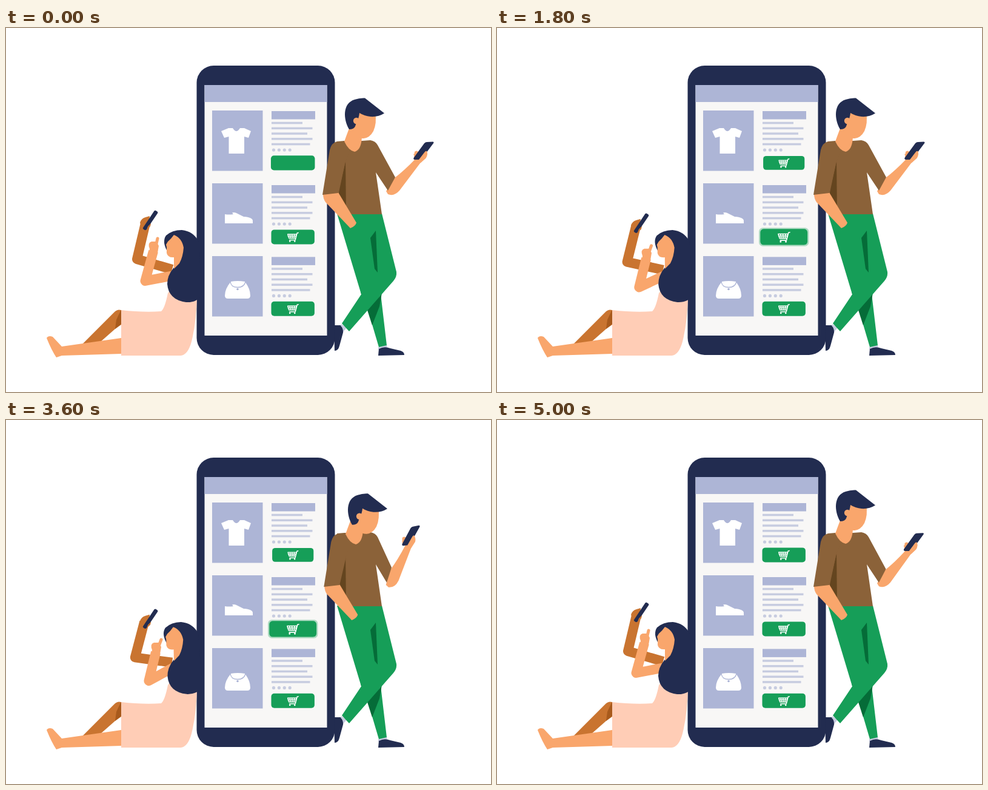
Write an HTML page that moves like this. It is 800 px wide and 600 px high and loops after 5040 ms.

```html
<!DOCTYPE html>
<html lang="en">
<head>
<meta charset="utf-8">
<title>Mobile shopping</title>
<style>
  html, body { margin: 0; width: 100%; height: 100%; overflow: hidden; background: #fff; }
  svg { display: block; width: 100%; height: 100%; }
  .navy { fill: #222c50; } .blue { fill: #adb5d6; } .line { fill: #c7cce0; }
  .green { fill: #169e58; } .deep { fill: #056c38; } .white { fill: #fff; }
  .skin { fill: #f9a66c; } .tan { fill: #c97430; } .shade { fill: #a85a1c; }
  .brown { fill: #8b6239; } .umber { fill: #64451f; } .dress { fill: #ffcdb6; }
  .limb { fill: none; stroke-width: 16; stroke-linejoin: round; }
  .cart { fill: none; stroke: #fff; stroke-width: 1.5; stroke-linecap: round; stroke-linejoin: round; }
</style>
</head>
<body>
<svg viewBox="0 0 800 600" xmlns="http://www.w3.org/2000/svg">
  <clipPath id="view"><rect x="327.500" y="122" width="202" height="372"/></clipPath>

  <!-- Phone -->
  <rect class="navy" x="314.5" y="62" width="228" height="477" rx="28"/>
  <rect x="327.500" y="94" width="202" height="413" fill="#f8f7f6"/>
  <rect class="blue" x="327.500" y="94" width="202" height="28"/>
  <g clip-path="url(#view)"><g id="list"></g></g>

  <!-- Seated woman -->
  <path class="tan" d="M126 521L179 468Q184 463 190 465V489L180 496 155 518Z"/>
  <path class="shade" d="M189 466L182 481 180 496 190 488V465Z"/>
  <path class="skin" d="M67 511Q70 506 77 509L92 525 190 511V537L92 540 83 543Q75 531 67 511Z"/>
  <path class="dress" d="M190 465Q226 469 256 467 262 462 267 437L290 405 315 443Q314 485 306 517 300 539 288 540H190Z"/>
  <path class="limb" id="farArm" stroke="#c97430"/>
  <g id="herPhone">
    <path class="tan" d="M221 321Q223 314 230 312L237 310 236 320 239 323 234 330 226 333Z"/>
    <path class="navy" d="M244.500 301.500Q246 300 248 301.500L250 303Q251 304 250 305.500L232 332Q230 334 228 332.500L226.500 331.500Q225 330 226.500 328.500Z"/>
    <path class="tan" d="M232 332L234 327 239 322 238 327Z"/>
  </g>
  <path class="limb" id="nearArm" stroke="#f9a66c"/>
  <g id="herHand">
    <path class="skin" d="M-7 3L-6 -4Q-10 -14 -3 -16L5 -16 9 -9 7 3Z"/>
    <path id="finger" stroke="#f9a66c" stroke-width="5" stroke-linecap="round"/>
  </g>
  <g id="herHead">
    <path class="navy" d="M266 368Q257 352 264 342 274 333 290 333 309 335 318 352L323 440Q315 453 297 452 268 448 266 422 266 408 276 396L285 384 284 360Z"/>
    <path class="skin" d="M277 341Q290 346 293 362 292 377 286 388L277 397V378Q267 379 265 371L265 361 264 357 267 352Q272 348 277 341Z"/>
  </g>

  <!-- Standing man -->
  <path class="navy" d="M541 490H553Q557 495 556 502L550 524Q548 532 542 532Z"/>
  <path class="line" d="M553 488L562 494 556 501Q556 494 552 491ZM614 526L628 522 629 527 614 530Z"/>
  <path class="navy" d="M615 529Q624 524 634 528L651 532Q657 534 657 539L614 540Z"/>
  <path class="green" d="M585 436L597 465 615 526 628 523 618 438Z"/>
  <path class="deep" d="M596 465L620 437 616 459 604 490Z"/>
  <path class="green" d="M546 306H620L644 402Q645 410 639 417L566 500 554 487 586 439Z"/>
  <path class="deep" d="M610 334L601 346 608 397 613 403Z"/>
  <g id="hand">
    <path class="skin" d="M627 269L641 247Q657 235 676 215L672 208 692 201Q697 207 693 214L683 223 649 268Q640 278 630 274Z"/>
    <g id="hisPhone">
      <path class="skin" id="thumb" d="M673 213L674 204Q677 201 680 204L682 210Z"/>
      <path class="navy" d="M672.500 214L690 190Q692 188 694 188L704 187.500Q706.500 188 705 190L687 214Q684.500 217 682 217H674Q671.500 216.500 672.500 214Z"/>
      <path class="skin" d="M681 217L691 204Q695 200 695 208L692 215 684 222Z"/>
    </g>
  </g>
  <path class="brown" id="shirt"/>
  <path class="umber" d="M560 219L561 306 548 276Z"/>
  <g id="leftArm">
    <path class="skin" d="M523 274L548 271 578 321Q576 327 568 330L527 287Q523 281 523 274Z"/>
    <path class="brown" d="M546 187Q537 189 534 201L522 275 548 272 560 220 570 195Z"/>
  </g>
  <path class="skin" id="neck" d="M568 160L558 187Q565 202 575 204 586 201 587 180Z"/>
  <g id="hisHead">
    <path class="skin" d="M572 138H609Q612 157 606 170 600 181 590 182 578 183 568 165Z"/>
    <path class="navy" d="M566 167C556 150 555 124 575 118Q583 115 592 115.500L624 140.500Q614 147 601 146 591 145 583 140 582 149 579 153L576 162Q574 167 566 167Z"/>
    <circle class="skin" cx="578" cy="153" r="5.200"/>
  </g>
</svg>
<script>
const LOOP = 5040, PERIOD = 359;
const CYCLES = [0, 1525, 3325];
const $ = id => document.getElementById(id);
const set = (id, name, value) => $(id).setAttribute(name, value);

const icons = [
  `<path class="white" d="M367 165H374Q380 175 386 165H393L404 170 400 181 393 179V207H367.500V179L360 181 355 170Z"/>`,
  `<path class="white" d="M361 187Q368 188 375 187L373 184.500Q377 183 382 186L392 191Q407 192 407 198V202H361Z"/>`,
  `<path class="white" d="M371 178Q382 176 394 178 403 190 403 201 403 206 398 206H366Q361 206 361 201 361 190 371 178Z"/>
   <path d="M370 178Q371 187.500 382 187.500T395 178" fill="none" stroke="#adb5d6" stroke-width="1.300"/>
   <circle class="blue" cx="382" cy="190.500" r="1.800"/>`
];

function row(i) {
  const kind = i % 3, base = Math.floor(i / 3) * PERIOD;
  const lines = [51, 67.5, 59, 67.5, 63.5].map((w, n) =>
    `<rect class="line" x="438" y="${154.8 + n * 8.75}" width="${w}" height="3.5"/>`).join('');
  const dots = [0, 1, 2, 3].map(n => `<circle class="line" cx="${441.5 + n * 8.9}" cy="201" r="2.6"/>`).join('');
  return `<g transform="translate(0 ${base + kind * 120})">
      <rect class="blue" x="340" y="136" width="83.500" height="99.500"/>${icons[kind]}
    </g>
    <g transform="translate(0 ${base + [0, 122, 240.4][kind]})">
      <rect class="blue" x="438" y="137" width="72" height="13.500"/>${lines}${dots}
      <g id="button${i}" transform="translate(473.2 222.4)">
        <rect class="green" id="glow${i}" opacity="0" x="-37.800" y="-14" width="75.600" height="28" rx="6"/>
        <rect class="green" x="-35.700" y="-12" width="71.400" height="24" rx="5"/>
        <g id="cart${i}" class="cart">
          <path d="M9 -7L7 -6.500 4 5H-5.500M-8.500 -4.500H6L4.500 2H-6.500ZM-8 -1.500H5M-5 -4.500L-4 2M-1.500 -4.500L-1 2M2.500 -4.500L1.800 2"/>
          <path d="M-5 7.200h.1M3 7.200h.1" stroke-width="2.600"/>
        </g>
      </g>
    </g>`;
}
$('list').innerHTML = Array.from({ length: 10 }, (_, i) => row(i)).join('');

// Smooth, non-overshooting curve through [time, value] points.
function track(t, keys) {
  const last = keys.length - 1;
  if (t <= keys[0][0]) return keys[0][1];
  if (t >= keys[last][0]) return keys[last][1];
  const rate = i => (keys[i + 1][1] - keys[i][1]) / (keys[i + 1][0] - keys[i][0]);
  const slope = i => {
    if (i === 0 || i === last) return 0;
    const a = rate(i - 1), b = rate(i);
    return a * b > 0 ? 2 * a * b / (a + b) : 0;
  };
  let i = 0;
  while (t > keys[i + 1][0]) i++;
  const [t0, v0] = keys[i], [t1, v1] = keys[i + 1], d = t1 - t0, u = (t - t0) / d, w = 1 - u;
  return v0 * w * w * (1 + 2 * u) + v1 * u * u * (3 - 2 * u) + d * u * w * (slope(i) * w - slope(i + 1) * u);
}

// Symmetric bezier easing with long, soft ends.
function ease(x, a = 0.862) {
  if (x <= 0 || x >= 1) return x <= 0 ? 0 : 1;
  let lo = 0, hi = 1;
  for (let n = 0; n < 24; n++) {
    const s = (lo + hi) / 2, w = 1 - s;
    if (3 * a * s * w * w + 3 * (1 - a) * s * s * w + s * s * s < x) lo = s; else hi = s;
  }
  return lo * lo * (3 - 2 * lo);
}

const press = [[-40, 1], [115, 1.09], [275, 0.955], [400, 1]];
const glow = [[0, 0], [115, 0.33], [210, 0]];
const armDrop = [[0, 0], [520, 1], [1100, 1], [1640, 0.2], [1800, 0.2], [2480, 0.72], [2900, 0.85],
  [3600, 0.45], [4360, 0.12], [5000, 0]];
const nearBend = [[680, 0], [1800, 0.8], [2480, 1], [3600, 1], [4360, 0.8], [5000, 0]];
const phoneIn = [[680, 0], [1120, 0.4], [1450, -0.4], [1680, 0], [2840, 0], [3360, 1], [3960, 1],
  [4360, 0.9], [4480, 0.77], [5000, 0.08], [5040, 0]];
const headDown = [[680, 0], [1120, 0.4], [1450, -0.2], [1680, 0], [2840, 0], [3360, 1], [3920, 1],
  [4360, 0.5], [4700, 0]];

function drawScreen(t) {
  const phase = t - CYCLES.findLast(start => start <= t);
  set('list', 'transform', `translate(0 ${-2 * PERIOD * ease((phase - 417.4) / 1156)})`);
  for (let i = 0; i < 3; i++) {
    const u = phase - i * 160;
    set('button' + i, 'transform', `translate(473.2 222.4) scale(${track(u, press)})`);
    set('glow' + i, 'opacity', track(u, glow));
  }
  set('cart0', 'opacity', t < 40 ? 0 : 1);
}

function drawWoman(t) {
  const g = track(t, armDrop), h = track(t, nearBend), lean = g * (1 - h);
  const wristX = 243 + 4 * h - 4 * lean, wristY = 368 + 15 * h - 4 * lean;
  set('farArm', 'd', `M274 ${398 + 4 * g}L${216 - 7 * g} ${381 + 23 * g} ${230 - 4 * g} ${322 + 24 * g}`);
  set('herPhone', 'transform', `translate(${-3 * lean} ${24 * g})`);
  set('nearArm', 'd', `M276 408L${229.5 + 6 * h} ${417 + 13 * h} ${wristX} ${wristY}`);
  set('herHand', 'transform', `translate(${wristX} ${wristY})`);
  set('finger', 'd', `M4 -8L${7 + 2 * h - 3 * lean} -21`);
  set('herHead', 'transform', `rotate(${-2.5 * g} 290 400)`);
}

function drawMan(t) {
  const k = track(t, phoneIn), h = track(t, headDown);
  const swipe = t > 1800 && t < 2820 ? Math.sin(Math.PI * (t - 1800) / 340) ** 2 : 0;
  set('hand', 'transform', `translate(${-k} 0) rotate(${-16 * k} 637 268)`);
  set('hisPhone', 'transform', `rotate(${8 * k} 688 204)`);
  set('thumb', 'transform', `translate(${2 * swipe} ${-3 * swipe})`);
  set('shirt', 'd', `M546 187L558 186H587L601 185Q609 186 613 193L${642 - 6 * k} ${246 - 3 * k} ${630 - 2 * k} 268 610 238 620 307H561L548 272Z`);
  set('leftArm', 'transform', `translate(${2.3 * h} 0)`);
  set('neck', 'transform', `translate(${2 * h} ${h})`);
  set('hisHead', 'transform', `translate(${5 * h} ${5.7 * h})`);
}

const origin = performance.now();
function frame() {
  const t = (performance.now() - origin) % LOOP;
  drawScreen(t);
  drawWoman(t);
  drawMan(t);
  requestAnimationFrame(frame);
}
frame();
</script>
</body>
</html>
```
